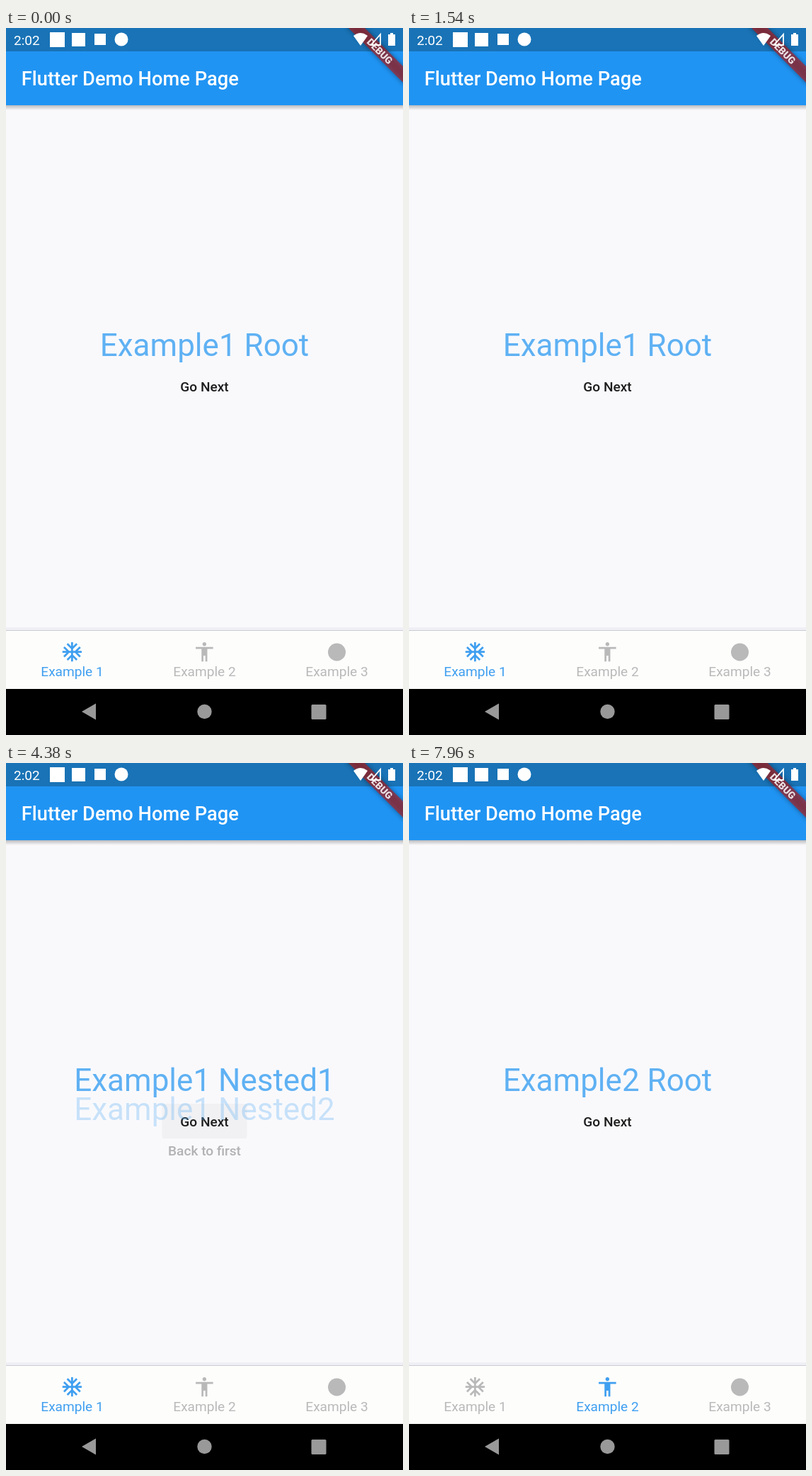
Recreate the animation shown at these times as an HTML page. Size 561 by 998 pixels, loop 8000 ms.

```html
<!DOCTYPE html>
<html lang="en">
<head>
<meta charset="utf-8">
<title>Nested navigation demo</title>
<style>
  html, body { margin: 0; width: 100%; height: 100%; overflow: hidden; background: #f9f9fc; }
  svg { display: block; width: 100%; height: 100%; font-family: Roboto, sans-serif; }
  .heading { font-size: 44px; fill: #5fb1f3; text-anchor: middle; }
  .button { font-size: 19.1px; font-weight: 500; fill: #1d1d1d; text-anchor: middle; }
  .tab { font-size: 19.1px; fill: #b9b9b9; text-anchor: middle; }
  .tab.active { fill: #3f9ff0; }
</style>
</head>
<body>
<svg viewBox="0 0 561 998">
  <defs>
    <linearGradient id="shade" x2="0" y2="1">
      <stop stop-color="#000" stop-opacity=".25"/>
      <stop offset="1" stop-color="#000" stop-opacity="0"/>
    </linearGradient>
    <filter id="soft" x="-20%" y="-100%" width="140%" height="300%"><feGaussianBlur stdDeviation="3.5"/></filter>
  </defs>
  <rect width="561" height="998" fill="#f9f9fc"/>
  <g id="pages"></g>

  <!-- App bar -->
  <rect y="109" width="561" height="7" fill="url(#shade)"/>
  <rect width="561" height="109" fill="#2094f3"/>
  <rect width="561" height="33" fill="#1973b6"/>
  <text x="21.8" y="81" font-size="27.27" font-weight="500" fill="#fff">Flutter Demo Home Page</text>

  <!-- Corner banner -->
  <g transform="translate(561 0) rotate(45)">
    <rect x="-60" y="38.2" width="120" height="16.3" opacity=".4" filter="url(#soft)"/>
    <rect x="-60" y="38.2" width="120" height="16.3" fill="#b71c1c" fill-opacity=".63"/>
    <text y="51.3" font-size="13.9" font-weight="900" fill="#fff" fill-opacity=".85" text-anchor="middle">DEBUG</text>
  </g>

  <!-- Status bar -->
  <g fill="#fff">
    <text x="11" y="24" font-size="19.1">2:02</text>
    <rect x="62" y="6" width="21" height="21"/>
    <rect x="93" y="7" width="19" height="19"/>
    <rect x="125" y="8" width="16" height="16"/>
    <circle cx="163" cy="16" r="9.5"/>
    <path d="M491 11Q501 3 511 11L501 25Z"/>
    <path d="M529 9V24H516Z" fill="none" stroke="#fff" stroke-width="1.8"/>
    <path d="M543 7h4v2h3v16h-10V9h3z"/>
  </g>

  <!-- Tabs -->
  <rect y="846" width="561" height="5" fill="#e9e9f2" opacity=".6"/>
  <rect y="850" width="561" height="83" fill="#fdfdfc"/>
  <rect y="850" width="561" height="1" fill="#cacad5"/>
  <g class="tab">
    <path transform="translate(77 864.3) scale(1.364)" d="M22 11h-4.17l3.24-3.24-1.41-1.42L15 11h-2V9l4.66-4.66-1.42-1.41L13 6.17V2h-2v4.17L7.76 2.93 6.34 4.34 11 9v2H9L4.34 6.34 2.93 7.76 6.17 11H2v2h4.17l-3.24 3.24 1.41 1.42L9 13h2v2l-4.66 4.66 1.42 1.41L11 17.83V22h2v-4.17l3.24 3.24 1.42-1.41L13 15v-2h2l4.66 4.66 1.41-1.42L17.83 13H22z"/>
    <text x="93.5" y="915">Example 1</text>
  </g>
  <g class="tab">
    <path transform="translate(264 864.3) scale(1.364)" d="M12 2c1.1 0 2 .9 2 2s-.9 2-2 2-2-.9-2-2 .9-2 2-2zm9 7h-6v13h-2v-6h-2v6H9V9H3V7h18v2z"/>
    <text x="280.5" y="915">Example 2</text>
  </g>
  <g class="tab">
    <circle cx="467.5" cy="881" r="12.5"/>
    <text x="467.5" y="915">Example 3</text>
  </g>

  <!-- System navigation -->
  <rect y="933" width="561" height="65"/>
  <g fill="#999">
    <path d="M107 965L127 953.5V976.5Z"/>
    <circle cx="280.5" cy="965" r="10.2"/>
    <rect x="431.5" y="955" width="21" height="21" rx="1.5"/>
  </g>
</svg>

<script>
const LOOP = 8000, SLIDE = 300, RISE = 185;
const OPEN_FIRST = 2840, OPEN_SECOND = 4230, GO_BACK = 5372, SWITCH_TAB = 7300;

const layer = document.getElementById('pages');
const tabs = document.querySelectorAll('.tab');

function makePage(title, label, buttonWidth) {
  const page = document.createElementNS('http://www.w3.org/2000/svg', 'g');
  page.innerHTML = `
    <rect x="${280.5 - buttonWidth / 2}" y="481" width="${buttonWidth}" height="49" rx="3"/>
    <text class="heading" x="280.5" y="463">${title}</text>
    <text class="button" x="280.5" y="513">${label}</text>`;
  return layer.appendChild(page);
}

const root = makePage('Example1 Root', 'Go Next', 120);
const first = makePage('Example1 Nested1', 'Go Next', 120);
const second = makePage('Example1 Nested2', 'Back to first', 146);
const otherRoot = makePage('Example2 Root', 'Go Next', 120);

const ramp = (t, start) => Math.min(1, Math.max(0, (t - start) / SLIDE));

function bezier(x1, y1, x2, y2) {
  const at = (a, b, s) => 3 * a * s * (1 - s) ** 2 + 3 * b * s * s * (1 - s) + s ** 3;
  return x => {
    let low = 0, high = 1;
    for (let i = 0; i < 20; i++) {
      const mid = (low + high) / 2;
      if (at(x1, x2, mid) < x) low = mid; else high = mid;
    }
    return at(y1, y2, (low + high) / 2);
  };
}
const glide = bezier(.4, 0, .2, 1), fade = bezier(.42, 0, 1, 1);

function place(page, progress, visible, t, tapTime) {
  page.style.display = visible && progress > 0 ? '' : 'none';
  page.setAttribute('opacity', fade(progress));
  page.setAttribute('transform', `translate(0 ${RISE * (1 - glide(progress))})`);
  const press = (t - tapTime) / 400;
  page.firstElementChild.setAttribute('opacity',
    press > 0 && press < 1 ? .035 * Math.sin(Math.PI * press) : 0);
}

function render(t) {
  const firstIn = ramp(t, OPEN_FIRST);
  const secondIn = ramp(t, OPEN_SECOND) - ramp(t, GO_BACK);
  const switched = t >= SWITCH_TAB;
  place(root, 1, firstIn < 1, t, OPEN_FIRST);
  place(first, firstIn, !switched && secondIn < 1, t, OPEN_SECOND);
  place(second, secondIn, true, t, GO_BACK);
  place(otherRoot, 1, switched, t, LOOP);
  tabs.forEach((tab, i) => tab.classList.toggle('active', i === Number(switched)));
}

function tick() {
  render(performance.now() % LOOP);
  requestAnimationFrame(tick);
}
tick();
</script>
</body>
</html>
```
